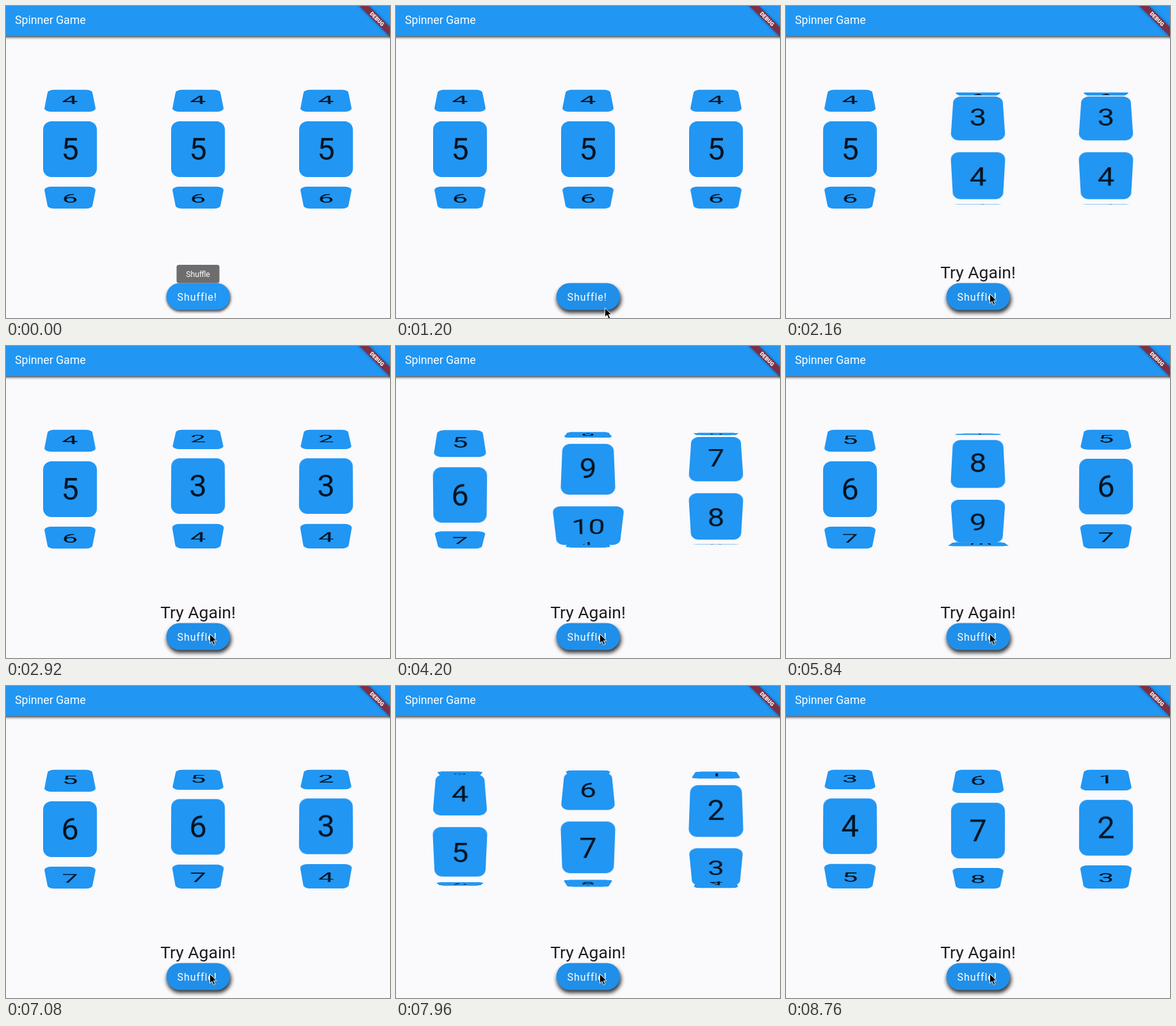
An HTML page for the animation above (8800 ms loop, 600 by 487 pixels).

```html
<!DOCTYPE html>
<html lang="en">
<head>
<meta charset="utf-8">
<title>Spinner Game</title>
<style>
  html, body { margin: 0; width: 100%; height: 100%; overflow: hidden; }
  body { position: relative; background: #faf9fc; font-family: Roboto, sans-serif; }
  #stage { position: absolute; left: 0; top: 0; width: 600px; height: 487px; overflow: hidden; }
  .card {
    position: absolute; top: 180px; height: 87px; line-height: 87px;
    border-radius: 13px; background: #2196f3; color: rgba(0, 0, 0, .87);
    font-size: 49px; text-align: center;
  }
  svg { position: absolute; left: 0; top: 0; }
</style>
</head>
<body>
<div id="stage">
  <div id="wheels"></div>
  <svg width="600" height="487" viewBox="0 0 600 487">
    <defs>
      <filter id="blur" x="-20%" y="-50%" width="140%" height="200%"><feGaussianBlur stdDeviation="2"/></filter>
      <filter id="softBlur" x="-20%" y="-50%" width="140%" height="200%"><feGaussianBlur stdDeviation="3.2"/></filter>
    </defs>

    <rect x="-10" y="0" width="620" height="48.5" fill="#000" opacity=".85" filter="url(#blur)"/>
    <rect width="600" height="47" fill="#2196f3"/>
    <text x="14" y="28.3" font-size="17.7" fill="#fff">Spinner Game</text>

    <g transform="translate(600 0) rotate(45)">
      <rect x="-40" y="23.5" width="80" height="10" fill="#000" opacity=".5" filter="url(#blur)"/>
      <rect x="-40" y="23.5" width="80" height="10.1" fill="#7c2f47"/>
      <text y="31.6" font-size="8.6" font-weight="900" fill="#fff" text-anchor="middle">DEBUG</text>
    </g>

    <text id="message" x="300" y="425" font-size="26.5" fill="#1d1c1f" text-anchor="middle">Try Again!</text>

    <rect id="restShadow" x="251" y="435" width="100" height="42" rx="21" opacity=".75" filter="url(#blur)"/>
    <rect id="hoverShadow" x="251" y="437" width="101" height="42" rx="21" opacity=".8" filter="url(#softBlur)"/>
    <rect id="button" x="250.5" y="432.5" width="99.5" height="42" rx="21"/>
    <text x="267.5" y="459.7" font-size="16" letter-spacing=".95" fill="#fff">Shuffle!</text>

    <g id="tooltip">
      <rect x="266.5" y="404" width="67" height="28.5" rx="3.5" fill="#6d6d6e"/>
      <text x="300" y="422.7" font-size="12.2" fill="#fff" text-anchor="middle">Shuffle</text>
    </g>

    <path id="cursor" d="M0 0V14.5L3.4 11.4L5.8 17L8.3 15.9L5.9 10.5H10.4Z"
          fill="#000" stroke="#fff" stroke-width=".9"/>
  </svg>
</div>

<script>
const LOOP = 8800, STEP = 40;
const RADIUS = 111, EYE = 333.3, PITCH = 51.5;
const SLOTS = 4, LABELS = 10;
const SPIN = 2560;
const START = [5, 5, 5];
const SHUFFLES = [
  { at: 1943, to: [5, 3, 3] },
  { at: 3685, to: [6, 10, 8] },
  { at: 5766, to: [6, 6, 3] },
  { at: 7770, to: [4, 7, 2] }
];

const byId = id => document.getElementById(id);
const clamp = v => Math.min(1, Math.max(0, v));
const mix = (a, b, k) => a + (b - a) * k;
const show = (id, opacity) => byId(id).style.opacity = opacity;

// Cubic Bézier (.07, 1, .04, 1): quick launch, long settling tail.
function spinEase(x) {
  if (x <= 0 || x >= 1) return clamp(x);
  let low = 0, high = 1;
  for (let i = 0; i < 24; i++) {
    const s = (low + high) / 2, r = 1 - s;
    if (.21 * s * r * r + .12 * s * s * r + s ** 3 < x) low = s; else high = s;
  }
  return 1 - (1 - low) ** 3;
}

const wheels = START.map((_, column) => Array.from({ length: SLOTS }, () => {
  const card = document.createElement('div');
  card.className = 'card';
  byId('wheels').append(card);
  return { card, center: 100 + 200 * column };
}));

function wheelPosition(column, time) {
  let position = START[column];
  for (const { at, to } of SHUFFLES) {
    if (time >= at) position = mix(position, to[column], spinEase((time - at) / SPIN));
  }
  return position;
}

function drawWheel(slots, position) {
  const first = Math.ceil(position - 90 / PITCH);
  slots.forEach(({ card, center }, i) => {
    const index = first + i;
    const angle = (index - position) * PITCH;
    const label = (index - 1 + LABELS) % LABELS + 1;
    const width = label > 9 ? 111 : 84;
    card.style.display = Math.abs(angle) <= 90 ? 'block' : 'none';
    card.textContent = label;
    card.style.width = width + 'px';
    card.style.left = center - width / 2 + 'px';
    card.style.transform =
      `perspective(${EYE}px) translateZ(${-RADIUS}px) rotateX(${-angle}deg) translateZ(${RADIUS}px)`;
  });
}

function draw(time) {
  wheels.forEach((slots, column) => drawWheel(slots, wheelPosition(column, time)));

  const approach = 1 - (1 - clamp((time - 1000) / 700)) ** 2;
  const x = mix(334, 318.5, approach), y = mix(492, 449.5, approach);
  byId('cursor').setAttribute('transform', `translate(${x} ${y})`);

  const hover = y < 473;
  byId('button').setAttribute('fill', hover ? '#208fe9' : '#2196f3');
  show('restShadow', hover ? 0 : .75);
  show('hoverShadow', hover ? .8 : 0);
  show('tooltip', 1 - clamp((time - 160) / 120));
  show('message', time >= SHUFFLES[0].at ? 1 : 0);
}

const begin = performance.now();
function tick() {
  const time = (performance.now() - begin) % LOOP;
  draw(Math.floor(time / STEP) * STEP);
  requestAnimationFrame(tick);
}
tick();
</script>
</body>
</html>
```
